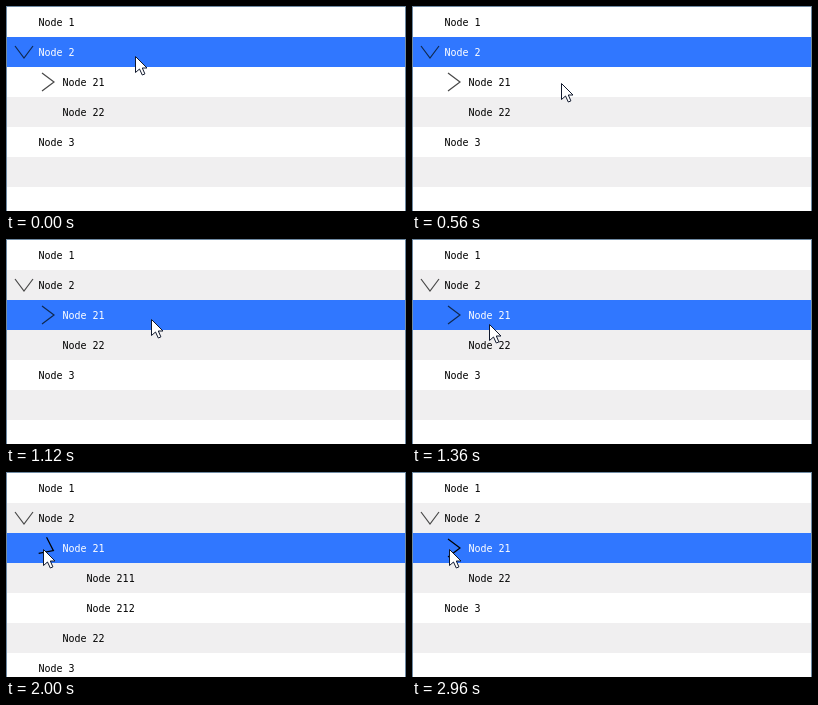
Write an HTML page with a canvas that moves like this. It is 400 by 205 pixels and loops after 3520 ms.

```html
<!DOCTYPE html>
<html lang="en">
<head>
<meta charset="utf-8">
<title>Tree view</title>
<style>
html, body { margin: 0; width: 100%; height: 100%; overflow: hidden; background: #fff; }
canvas { display: block; }
</style>
</head>
<body>
<canvas id="stage" width="400" height="205"></canvas>
<script>
const ctx = document.getElementById('stage').getContext('2d');
const LOOP = 3520, STEP = 80, ROW = 30, INDENT = 24;
const SELECT_AT = 800, EXPAND_AT = 2000, COLLAPSE_AT = 2960;
const BLUE = '#3077ff', STRIPE = '#f0eff0', BORDER = '#6f8aa3';
const FONT = '10px "DejaVu Sans Mono", "Liberation Mono", monospace';

// Pointer paths: start time, then one position per step.
const REST = [129, 50];
const MOVES = [
  [240, [[131, 53], [137, 63], [143, 71], [147, 75], [149, 77], [150, 78]]],
  [1120, [[145, 80], [128, 84], [102, 86], [77, 85], [57, 82], [45, 79], [39, 78], [38, 77], [37, 77]]]
];

function pointerAt(t) {
  let position = REST;
  for (const [start, points] of MOVES) {
    if (t >= start) {
      position = points[Math.min(points.length - 1, Math.floor((t - start) / STEP))];
    }
  }
  return position;
}

function visibleNodes(expanded) {
  return [
    ['Node 1', 0], ['Node 2', 0], ['Node 21', 1],
    ...(expanded ? [['Node 211', 2], ['Node 212', 2]] : []),
    ['Node 22', 1], ['Node 3', 0]
  ];
}

function drawChevron(x, y, degrees, color) {
  ctx.save();
  ctx.translate(x, y);
  ctx.rotate(degrees * Math.PI / 180);
  ctx.beginPath();
  ctx.moveTo(-6, -9);
  ctx.lineTo(6, 0);
  ctx.lineTo(-6, 9);
  ctx.strokeStyle = color;
  ctx.lineWidth = 1.2;
  ctx.stroke();
  ctx.restore();
}

function drawPointer(x, y) {
  ctx.save();
  ctx.translate(x + 0.5, y + 0.5);
  ctx.beginPath();
  [[0, 0], [0, 16], [4, 12.5], [6.8, 18.5], [9.4, 17.4], [6.8, 11.5], [11.5, 11.5]]
    .forEach(([px, py]) => ctx.lineTo(px, py));
  ctx.closePath();
  ctx.fillStyle = '#fff';
  ctx.fill();
  ctx.strokeStyle = '#10182c';
  ctx.lineWidth = 1;
  ctx.stroke();
  ctx.restore();
}

function draw(time) {
  const t = Math.floor((time % LOOP) / STEP) * STEP;
  const expanded = t >= EXPAND_AT && t < COLLAPSE_AT;
  const selected = t < SELECT_AT ? 1 : 2;
  const [x, y] = pointerAt(t);
  const hovered = x < 50;
  const turn = expanded ? Math.min(90, 26 + (t - EXPAND_AT) / STEP * 25) : 0;

  ctx.fillStyle = '#fff';
  ctx.fillRect(0, 0, 400, 205);
  for (let row = 0; row < 7; row++) {
    ctx.fillStyle = row === selected ? BLUE : row % 2 ? STRIPE : '#fff';
    ctx.fillRect(0, 1 + row * ROW, 400, ROW);
  }

  ctx.fillStyle = BORDER;
  ctx.fillRect(0, 0, 400, 1);
  ctx.fillRect(0, 0, 1, 205);
  ctx.fillRect(399, 0, 1, 205);

  const idle = row => row === selected ? '#10294f' : '#484848';
  drawChevron(18, 46, 90, idle(1));
  drawChevron(42, 76, turn, hovered ? '#000' : idle(2));

  ctx.font = FONT;
  ctx.textBaseline = 'alphabetic';
  visibleNodes(expanded).forEach(([label, depth], row) => {
    ctx.fillStyle = row === selected ? '#fff' : '#000';
    ctx.fillText(label, 32.5 + depth * INDENT, 20 + row * ROW);
  });

  drawPointer(x, y);
}

const started = performance.now();
function tick() {
  draw(performance.now() - started);
  requestAnimationFrame(tick);
}
tick();
</script>
</body>
</html>
```
